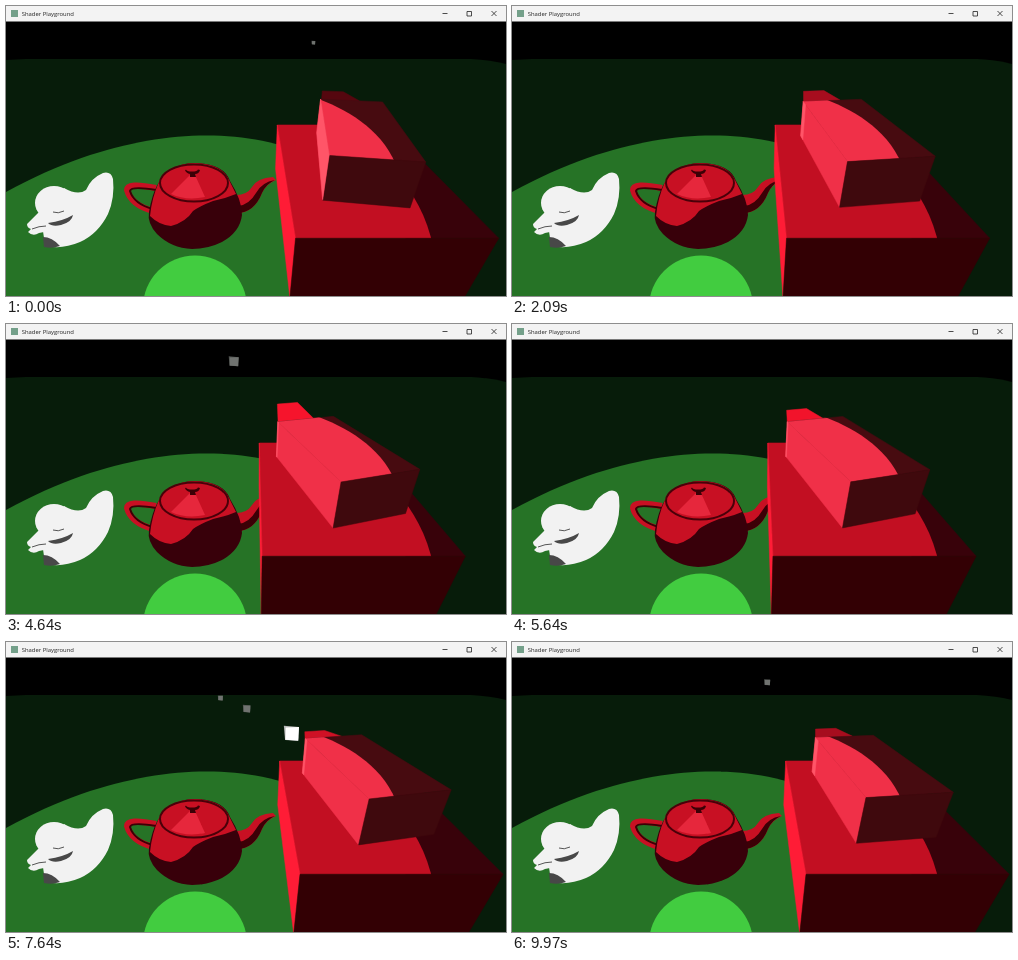
Recreate the animation shown at these times as an HTML page. Size 500 px wide and 290 px high, loop 10 s.

```html
<!DOCTYPE html>
<html lang="en">
<head>
<meta charset="utf-8">
<title>Shader Playground</title>
<style>
  html, body { margin: 0; width: 100%; height: 100%; overflow: hidden; background: #000; }
  svg { display: block; width: 500px; height: 290px; }
  text { font: 5.9px "Open Sans", "Noto Sans", sans-serif; fill: #222; }
</style>
</head>
<body>
<svg viewBox="0 0 500 290">
  <defs>
    <clipPath id="spotHigh"><polygon/></clipPath>
    <clipPath id="spotLow"><polygon/></clipPath>
  </defs>

  <rect width="500" height="290"/>
  <path fill="#071c0a" d="M0 54L20 53H465Q485 54 500 58V290H0Z"/>
  <polygon id="pool" fill="#267326"/>
  <circle cx="189" cy="301.500" r="52" fill="#42cc40"/>

  <g id="duck" fill="#f2f2f2">
    <path d="M58 182Q72 190 80 184Q85 172 97 167Q105 165 107 173Q109 192 102 208Q92 228 74 236Q60 242 47 241Q38 240 38 232L34 205Z"/>
    <ellipse cx="48" cy="197" rx="19" ry="17"/>
    <path d="M33 206L21 218Q21 222 25 223L22 226Q27 231 33 227L48 224V206Z"/>
    <path fill="#484848" d="M37 231Q46 231 54 240Q46 243 38 241ZM42 217Q57 215 67 209Q66 216 55 219Q46 221 42 217Z"/>
    <path fill="none" stroke="#555" d="M47 206Q52 208 58 205M26 223Q33 220 40 220"/>
  </g>

  <g id="teapot" fill="#c81023">
    <path fill="none" stroke="#c81023" stroke-width="6" d="M150 182Q121 176 121 184Q125 199 147 205"/>
    <path fill="none" stroke="#3c0006" stroke-width="2" d="M150 184Q125 180 124 185Q128 198 147 203"/>
    <path d="M230 189Q241 189 246 181Q251 172 267 171L270 174Q260 178 256 187Q248 207 231 207Z"/>
    <path fill="#3c0006" d="M232 200Q243 199 250 187Q256 176 269 174Q260 178 256 187Q248 207 231 207Z"/>
    <path fill="#38000a" d="M152 178Q163 157 190 157Q218 158 224 175Q236 194 236 209Q234 226 216 236Q202 243 186 243Q165 242 151 228Q141 217 143 206Q146 188 152 178Z"/>
    <path d="M153 176Q163 158 189 157Q216 158 223 174L230 188Q218 193 207 195Q194 200 187 205Q180 216 165 220Q153 219 144 210Q146 191 153 176Z"/>
    <ellipse cx="188" cy="177" rx="34" ry="18.500" stroke="#4a0009" stroke-width="2"/>
    <path fill="#e6273c" d="M184 169L165 188Q180 195 199 191L189 169Z"/>
    <path fill="#3c0006" d="M179 164Q187 161 194 164Q193 168 189 168L190 171H184V168Q180 167 179 164Z"/>
    <ellipse cx="186" cy="163.500" rx="6" ry="2"/>
  </g>

  <g id="shots"></g>
  <g id="boxes" stroke-linejoin="round" stroke-width=".5"></g>

  <rect width="500" height="15.500" fill="#f3f3f3"/>
  <rect x="5" y="4" width="7" height="7" fill="#74a08a"/>
  <text x="15.700" y="9.800">Shader Playground</text>
  <path fill="none" stroke="#222" stroke-width=".8" d="M436.500 7.500H441.500M461 5.500H465.500V10H461ZM485.500 5L490.500 10M490.500 5L485.500 10"/>
</svg>
<script>
const LOOP = 10;
const $ = s => document.querySelector(s);
const clamp = (v, lo, hi) => Math.min(hi, Math.max(lo, v));

function add(parent, tag, attrs = {}) {
  const el = document.createElementNS('http://www.w3.org/2000/svg', tag);
  for (const k in attrs) el.setAttribute(k, attrs[k]);
  return parent.appendChild(el);
}

// Camera at the origin, pitched down; x right, y up, z ahead
const FOCAL = 287, PITCH = Math.PI / 6;
const SIN = Math.sin(PITCH), COS = Math.cos(PITCH);
function project([x, y, z]) {
  const k = FOCAL / (z * COS - y * SIN);
  return [250 + x * k, 152.5 - (z * SIN + y * COS) * k];
}
const plot = (el, pts) => el.setAttribute('points', pts.map(p => p.map(n => n.toFixed(2)).join()).join(' '));
const shape = (el, ...pts) => plot(el, pts.map(project));

// Heights of the surfaces
const GROUND = -1.45, SHELF = -1, ROOF = -.714;

// Round pool of the spotlight on a level surface
function pool(el, y, r) {
  const ring = Array.from({ length: 120 }, (_, i) => {
    const a = i * Math.PI / 60;
    return [-.58 + r * Math.cos(a), y, 1.45 + r * Math.sin(a)];
  });
  shape(el, ...ring);
}
pool($('#pool'), GROUND, 1.6);
pool($('#spotLow polygon'), SHELF, 1.48);
pool($('#spotHigh polygon'), ROOF, 1.28);

// Key points: [seconds, value]
const SLIDE = [[1.4, .664], [3.05, .495], [4.2, .497], [6.2, .542], [7.2, .685]];
const YAW = [[0, -8.3], [.8, 2.5], [3.1, 10], [4.9, 17], [10, 6.5]];
const LIFT = [[0, .05], [3.1, .07], [4.6, .12], [6.5, .03], [10, .05]];

function at(keys, t) {
  const i = clamp(keys.findIndex(k => k[0] > t), 1, keys.length - 1);
  const j = t >= keys[keys.length - 1][0] ? keys.length - 1 : i;
  const [t0, a] = keys[j - 1], [t1, b] = keys[j];
  return a + (b - a) * clamp((t - t0) / (t1 - t0), 0, 1);
}

const face = (fill, clip) => add($('#boxes'), 'polygon',
  { fill, stroke: fill, ...(clip && { 'clip-path': `url(#${clip})` }) });
const makeBox = (side, front, top, lit, clip) =>
  ({ top: face(top), lit: face(lit, clip), side: face(side), front: face(front) });

const low = makeBox('#ff1c36', '#330004', '#38020a', '#c20f22', 'spotLow');
const rear = face('#f00');
const high = makeBox('#f03048', '#3f090d', '#470b10', '#f03048', 'spotHigh');
const sheen = face('#ff5568');

// Maps a box's own x and z to the world
function frame(cx, cz, yaw) {
  const s = Math.sin(yaw), c = Math.cos(yaw);
  return (x, y, z) => [cx + x * c - z * s, y, cz + x * s + z * c];
}

function drawBox(box, put, w, d, top, foot) {
  const roof = [put(-w, top, -d), put(w, top, -d), put(w, top, d), put(-w, top, d)];
  shape(box.top, ...roof);
  shape(box.lit, ...roof);
  shape(box.side, roof[0], roof[3], put(-w, foot, d), put(-w, foot, -d));
  shape(box.front, roof[0], roof[1], put(w, foot, -d), put(-w, foot, -d));
}

function drawBoxes(t) {
  const x = at(SLIDE, t), yaw = at(YAW, t), lift = ROOF + at(LIFT, t);
  drawBox(low, frame(x, 1.65, 0), .478, .668, SHELF, GROUND);

  const put = frame(x, 1.68, yaw * Math.PI / 180);
  shape(rear, put(-.22, lift, .5), put(-.06, lift, .5), put(.06, ROOF, .45), put(-.22, ROOF - .1, .45));
  const red = Math.max(85, 110 + 8.5 * yaw);
  const tone = `rgb(${red},${red * .08},${red * .18})`;
  rear.setAttribute('fill', tone);
  rear.setAttribute('stroke', tone);

  drawBox(high, put, .23, .45, ROOF, SHELF);
  const z = .45 - .9 * Math.min(1, .25 * Math.exp(-yaw / 6));
  shape(sheen, put(-.23, ROOF, .45), put(-.23, ROOF, z), put(-.23, SHELF, z), put(-.23, SHELF, .45));
}

// Cubes thrown towards the viewer, placed where they are 4 px wide
const shot = (time, x, y, drift) => ({ time, x, y, drift });
const shots = [shot(.12, 303.4, 38, -53), shot(3.73, 255, 13, -30), shot(9.46, 247, 31, 20)];
for (let i = 0; i < 3; i++) shots.push(shot(6.52 + .4 * i, 199, 51, 65));

for (const s of shots) {
  s.g = add($('#shots'), 'g');
  s.side = add(s.g, 'path', { d: 'M-.5 -.5L.5 -.42L.45 .5L-.42 .45Z' });
  s.front = add(s.g, 'path', { d: 'M-.38 -.38L.5 -.42L.45 .5L-.4 .42Z' });
}

function drawShot({ time, x, y, drift, g, side, front }, t) {
  const depth = .25 - .164 * (t - time);
  const on = depth > .05 && depth < .3;
  g.setAttribute('visibility', on ? 'visible' : 'hidden');
  if (!on) return;
  const near = Math.log(.25 / depth);
  const py = y + 19 * near + 8.5 * near * near;
  const lit = py > 78;
  g.setAttribute('transform', `translate(${x + drift * near} ${py}) scale(${1 / depth})`);
  side.setAttribute('fill', lit ? '#b8b8b8' : '#525552');
  front.setAttribute('fill', lit ? '#fff' : '#707370');
}

const start = performance.now();
function tick() {
  const t = (performance.now() - start) / 1000 % LOOP;
  drawBoxes(t);
  for (const s of shots) drawShot(s, t);
  requestAnimationFrame(tick);
}
tick();
</script>
</body>
</html>
```
